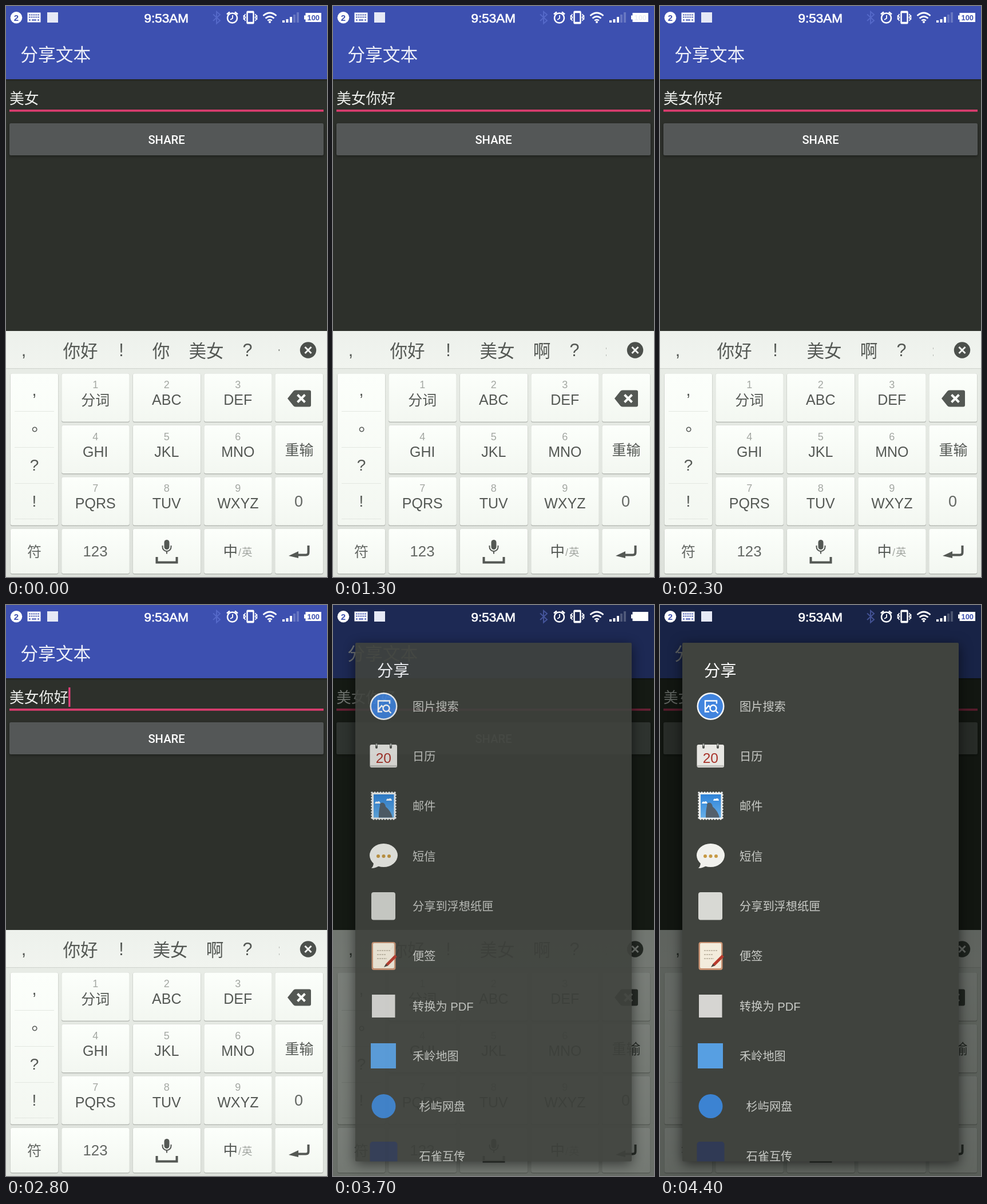
Recreate the animation shown at these times as an HTML page. Size 561 by 998 pixels, loop 4.5 s.

```html
<!DOCTYPE html>
<html lang="zh-CN">
<head>
<meta charset="utf-8">
<title>分享文本</title>
<style>
html, body { margin: 0; width: 100%; height: 100%; overflow: hidden; background: #2d302b; }
svg { display: block; width: 100%; height: 100%; }
text { font-family: "Liberation Sans", "Noto Sans CJK SC", "Noto Sans CJK", sans-serif; white-space: pre; }
.cjk { font-family: "Noto Sans CJK SC", "Noto Sans CJK", sans-serif; }
.light { font-weight: 300; }
.mid { text-anchor: middle; }
.share { font-family: Roboto, sans-serif; font-weight: 500; }
#panel { filter: drop-shadow(0 5px 11px rgba(0, 0, 0, .6)); }
#button { filter: drop-shadow(0 2px 2px rgba(0, 0, 0, .35)); }
</style>
</head>
<body>
<svg viewBox="0 0 561 998" xmlns="http://www.w3.org/2000/svg">
  <defs>
    <linearGradient id="key" x2="0" y2="1"><stop stop-color="#fcfffb"/><stop offset="1" stop-color="#f3f7f1"/></linearGradient>
    <linearGradient id="bar" x2="0" y2="1"><stop stop-color="#edf1ec"/><stop offset="1" stop-color="#f1f4ef"/></linearGradient>
    <linearGradient id="board" x2="0" y2="1"><stop stop-color="#eaeee8"/><stop offset="1" stop-color="#dde1db"/></linearGradient>
    <linearGradient id="drop" x2="0" y2="1"><stop stop-color="#000" stop-opacity=".3"/><stop offset="1" stop-color="#000" stop-opacity="0"/></linearGradient>
    <linearGradient id="sky" x2="0" y2="1"><stop stop-color="#2f83d8"/><stop offset="1" stop-color="#65afea"/></linearGradient>
    <clipPath id="inside"><rect x="39" y="66" width="483" height="906.5"/></clipPath>
  </defs>

  <rect width="561" height="998" fill="#2d302b"/>
  <rect width="561" height="128" fill="#3d50b0"/>
  <rect y="128" width="561" height="4" fill="url(#drop)"/>
  <g id="page">
    <rect x="6" y="181" width="549" height="3.8" fill="#d63c6d"/>
    <rect id="cursor" x="109.2" y="144" width="3.3" height="34" fill="#e2407a"/>
    <rect id="button" x="6" y="205" width="549" height="56" rx="2.5" fill="#545757"/>
  </g>

  <g id="keyboard">
    <rect y="568" width="561" height="430" fill="url(#board)"/>
    <rect y="568" width="561" height="66" fill="url(#bar)"/>
    <rect y="633" width="561" height="1.2" fill="#d2d6d0"/>
    <g id="before"></g>
    <g id="after"></g>
    <circle cx="528" cy="601.5" r="14.2" fill="#4c504c"/>
    <path d="M522.5 596l11 11m0-11l-11 11" stroke="#f4f7f3" stroke-width="3"/>
    <g id="keys"></g>
    <path d="M492 686l10-12.5q1.500-2 4-2h24q3 0 3 3v23q0 3-3 3h-24q-2.500 0-4-2z" fill="#545854"/>
    <path d="M509.500 679.500l13 13m0-13l-13 13" stroke="#fbfefa" stroke-width="4"/>
    <g fill="none" stroke="#545854">
      <rect x="276.5" y="933" width="9" height="17" rx="4.5" fill="#545854" stroke="none"/>
      <path d="M273.5 943v2.5a7.5 7.5 0 0 0 15 0V943M281 953v4.5" stroke-width="2"/>
      <path d="M263.5 963v9.5h35V963" stroke-width="4"/>
      <path d="M528.5 943v12q0 4.5-4.5 4.5h-13" stroke-width="4"/>
      <path d="M494 961l17-8v12z" fill="#545854" stroke="none"/>
    </g>
  </g>

  <rect id="dim" width="561" height="998" fill="#000600" opacity="0"/>

  <g id="dialog">
    <rect id="panel" x="39" y="66" width="483" height="906.5" rx="2" fill="#40433e"/>
    <g id="list" clip-path="url(#inside)">
      <circle cx="88.5" cy="177" r="24" fill="#f4f6f8"/>
      <circle cx="88.5" cy="177" r="21.5" fill="#4184de"/>
      <g fill="none" stroke="#fff" stroke-width="2.4">
        <path d="M86 186.500h-7v-19h20v5M79 183l6-7 3 3"/>
        <circle cx="93" cy="180.5" r="5.5"/><path d="M97 184.500l4.500 4.500"/>
      </g>

      <rect x="64.5" y="244" width="47.5" height="40" rx="3" fill="#e8e7e3"/>
      <path d="M65 281.5h46.5" stroke="#c4c3bf" stroke-width="3"/>
      <path d="M76 244v5m25-5v5" stroke="#50524e" stroke-width="4" stroke-linecap="round"/>
      <path d="M76 242.500v4m25-4v4" stroke="#b4b6b2" stroke-width="2.5"/>

      <rect x="68" y="328" width="41" height="46" fill="#eceeed"/>
      <rect x="68" y="328" width="41" height="46" fill="none" stroke="#eceeed" stroke-width="3.5" stroke-linecap="round" stroke-dasharray=".1 4.9"/>
      <rect x="71" y="331" width="35.5" height="40.5" fill="url(#sky)"/>
      <path d="M73 347q1-5 5-3 3-3 5 3zm20-5q1-5 4-3 5-3 6 3z" fill="#f3f7fb"/>
      <path d="M80 371.500q0-13 2-20-1-7 5-6 4 1 5 7 9 7 12 19z" fill="#53606c"/>

      <ellipse cx="88.5" cy="437.5" rx="24.5" ry="20.5" fill="#f1f1ed"/>
      <path d="M71 449q0 8-4 11 9 0 16-6z" fill="#f1f1ed"/>
      <g fill="#c79a45"><circle cx="79" cy="439" r="3"/><circle cx="88.5" cy="439" r="3"/><circle cx="98" cy="439" r="3"/></g>

      <rect x="67" y="502" width="42" height="48.5" rx="4" fill="#d8d9d4"/>

      <rect x="67.5" y="589" width="42" height="49" rx="4" fill="#c99272"/>
      <rect x="70" y="591" width="37" height="44" rx="2" fill="#f3ecdc"/>
      <path d="M77 604h23m-23 7h15m-15 7h17" stroke="#b5aa98" stroke-width="1.5" stroke-dasharray="3 1"/>
      <path d="M110 613l-16 16" stroke="#b83a2c" stroke-width="5"/>
      <path d="M96 630.5l-7 2.5 3.500-6z" fill="#4a403a"/>

      <rect x="68" y="681" width="40.5" height="40" fill="#d6d5d2"/>
      <rect x="66" y="766" width="44" height="44" fill="#579fe2"/>
      <circle cx="88.5" cy="876" r="21" fill="#3c83d2"/>
      <rect x="64.5" y="938" width="48" height="48" rx="5" fill="#303a55"/>
    </g>
  </g>

  <g id="status" fill="#fff">
    <circle cx="18" cy="20.3" r="10.3"/>
    <rect x="37.5" y="11.5" width="23" height="17"/>
    <path d="M40 15.5h18M40 19.5h18" stroke="#3d50b0" stroke-width="2" stroke-dasharray="2 1.2"/>
    <path d="M40 24.5h3m2 0h8m2 0h3" stroke="#3d50b0" stroke-width="2"/>
    <rect x="72" y="11" width="19" height="18" fill="#e6e9f6"/>
    <g fill="none" stroke="#fff">
      <path d="M362 14.5l12 11-6 5V10l6 5-12 11" stroke="#6b80e0" stroke-opacity=".5" stroke-width="2"/>
      <circle cx="395.5" cy="21" r="8.5" stroke-width="2.5"/>
      <path d="M396 16v5.5l-4 2.5" stroke-width="1.8"/>
      <path d="M386 14.5l5-4m9 0l5 4" stroke-width="2.8"/>
      <rect x="421.5" y="10" width="11" height="20" rx="1" stroke-width="2.5"/>
      <path d="M421 10.5h12m-12 19h12" stroke-width="3.5"/>
      <path d="M418.5 14l-2 3 2 3-2 3 2 3m17-12l2 3-2 3 2 3-2 3m-20-10v8m23-8v8" stroke-width="1.6"/>
      <path d="M449.5 17q11.500-10 23 0m-19 4.500q7.500-6.500 15 0" stroke-width="2.8"/>
      <path d="M457.2 25.5q3.800-3 7.600 0" stroke-width="2.5"/>
    </g>
    <circle cx="461" cy="28" r="2"/>
    <path d="M483 25h4v4h-4zm6.500-2h4v6h-4zm6.500-4h4v10h-4z"/>
    <path d="M502 15h4v14h-4zm6-4h4v18h-4z" opacity=".22"/>
    <path d="M523.5 12h27.500v16h-27.500v-4.500h-2.500v-7h2.500z"/>
  </g>
</svg>
<script>
const NS = "http://www.w3.org/2000/svg";
const LOOP = 4500;
const $ = id => document.getElementById(id);

function add(parent, tag, attrs) {
  const el = document.createElementNS(NS, tag);
  for (const k in attrs) el.setAttribute(k, attrs[k]);
  return $(parent).appendChild(el);
}

function label(parent, text, x, y, size, fill, cls = "") {
  const el = add(parent, "text", { x, y, "font-size": size, fill, class: cls });
  el.textContent = text;
  return el;
}

// Page
label("page", "分享文本", 25.2, 96, 30.8, "#eef0f9", "cjk");
const field = label("page", "", 6, 171, 25.8, "#eceeeb", "cjk");
label("page", "SHARE", 280.5, 240.7, 20.2, "#fff", "share mid");

// Candidate strip
const ink = "#545854", soft = "#646864", pale = "#a3a7a2";
function strip(parent, items) {
  for (const [text, x] of items) {
    const latin = text.charCodeAt(0) < 128;
    label(parent, text, x, latin ? 612 : 613.5, 30.6, ink, latin ? "mid" : "cjk light mid");
  }
}
const shared = [[",", 31], ["你好", 130], ["!", 201.5], ["?", 422]];
strip("before", [...shared, ["你", 271], ["美女", 350]]);
strip("after", [...shared, ["美女", 287], ["啊", 365]]);
add("before", "rect", { x: 476.5, y: 600, width: 1.6, height: 3, fill: "#7d817c" });
for (const y of [597, 609])
  add("after", "rect", { x: 477, y, width: 1, height: 3, fill: "#b5b8b3" });

// Keys
function key(x, y, w, h) {
  add("keys", "rect", { x: x - .5, y: y + .5, width: w + 1, height: h + 1, rx: 3.5, fill: "#b4b8b2" });
  add("keys", "rect", { x: x - .5, y: y - .5, width: w + 1, height: h + .5, rx: 3.5, fill: "#d6dad4" });
  add("keys", "rect", { x, y, width: w, height: h, rx: 3, fill: "url(#key)" });
}
const cols = [[8, 83], [97.5, 118], [222, 118], [346.5, 118], [470.5, 83.5]];
const rows = [[642.5, 84], [733, 84], [823.5, 84], [914, 78]];
key(8, 642.5, 83, 265);
rows.forEach(([y, h], r) => cols.forEach(([x, w], c) => {
  if (c || r === 3) key(x, y, w, h);
}));
for (const y of [708, 771, 834, 896])
  add("keys", "rect", { x: 15, y, width: 69, height: 1, fill: "#e3e7e1" });

["分词", "ABC", "DEF", "GHI", "JKL", "MNO", "PQRS", "TUV", "WXYZ"].forEach((name, i) => {
  const x = 156.3 + i % 3 * 124.5, y = Math.floor(i / 3) * 90.5;
  label("keys", i + 1, x, 668.3 + y, 18, pale, "mid");
  label("keys", name, x, (i ? 697 : 698) + y, 25, ink, i ? "mid" : "cjk mid");
});
label("keys", ",", 49.5, 681, 29, ink, "mid");
label("keys", "。", 44.5, 742.5, 29, ink, "cjk");
label("keys", "?", 49.5, 811.5, 28, ink, "mid");
label("keys", "!", 49.5, 874.5, 28, ink, "mid");
label("keys", "重输", 512.5, 784.5, 25, ink, "cjk mid");
label("keys", "0", 511.5, 875, 27, soft, "mid");
label("keys", "符", 49.5, 962.5, 25, soft, "cjk mid");
label("keys", "123", 156, 961.5, 25.8, soft, "mid");
label("keys", "中", 379.5, 962, 25.5, ink, "cjk");
label("keys", "/", 406, 960.5, 18, pale);
label("keys", "英", 412, 961, 18.5, pale, "cjk");

// Share dialog
label("list", "分享", 77, 124.5, 28.3, "#fff", "cjk");
label("list", "20", 88.3, 276, 24.5, "#a9342b", "mid");
["图片搜索", "日历", "邮件", "短信", "分享到浮想纸匣", "便签", "转换为 PDF", "禾岭地图", "杉屿网盘", "石雀互传"]
  .forEach((name, i) => label("list", name, i < 8 ? 139 : 150.5, 184.7 + i * 87.35, 20.2, "#c9cbc7"));

// Status bar
label("status", "2", 18, 25.8, 15, "#3d50b0", "mid").setAttribute("font-weight", "bold");
const clock = label("status", "9:53AM", 280.3, 28.5, 22.5, "#fff", "mid");
clock.setAttribute("stroke", "#fff");
clock.setAttribute("stroke-width", .7);
const charge = label("status", "100", 537.3, 24.8, 12.8, "#3d50b0", "mid");
charge.setAttribute("font-weight", "bold");

// Each track is a list of [start ms, value]; values hold until the next step.
const tracks = {
  text: [[0, "美女"], [700, "美女你好"]],
  cursor: [[0, 0], [200, 1], [1200, 0], [1700, 1], [2200, 0], [2700, 1], [3200, 0]],
  charge: [[0, 1], [1200, .5], [1300, .1], [1400, 0], [1800, 1], [3500, .3], [3600, 0], [4000, .4], [4100, 1]],
  button: [[0, "#545757"], [3400, "#5a5d5c"], [3500, "#616463"]],
  dim: [[0, 0], [3700, .52], [3800, .6]],
  dialog: [[0, 0], [3700, .9], [3800, 1]]
};
const at = (name, t) => tracks[name].findLast(step => step[0] <= t)[1];

function draw(t) {
  const text = at("text", t);
  const typed = text.length > 2;
  field.textContent = text;
  $("cursor").setAttribute("x", typed ? 109.2 : 57.6);
  $("cursor").setAttribute("opacity", at("cursor", t));
  $("before").setAttribute("visibility", typed ? "hidden" : "visible");
  $("after").setAttribute("visibility", typed ? "visible" : "hidden");
  $("button").setAttribute("fill", at("button", t));
  $("dim").setAttribute("opacity", at("dim", t));
  $("dialog").setAttribute("opacity", at("dialog", t));
  charge.setAttribute("opacity", at("charge", t));
}

const start = performance.now();
function tick() {
  draw((performance.now() - start) % LOOP);
  requestAnimationFrame(tick);
}
tick();
</script>
</body>
</html>
```
